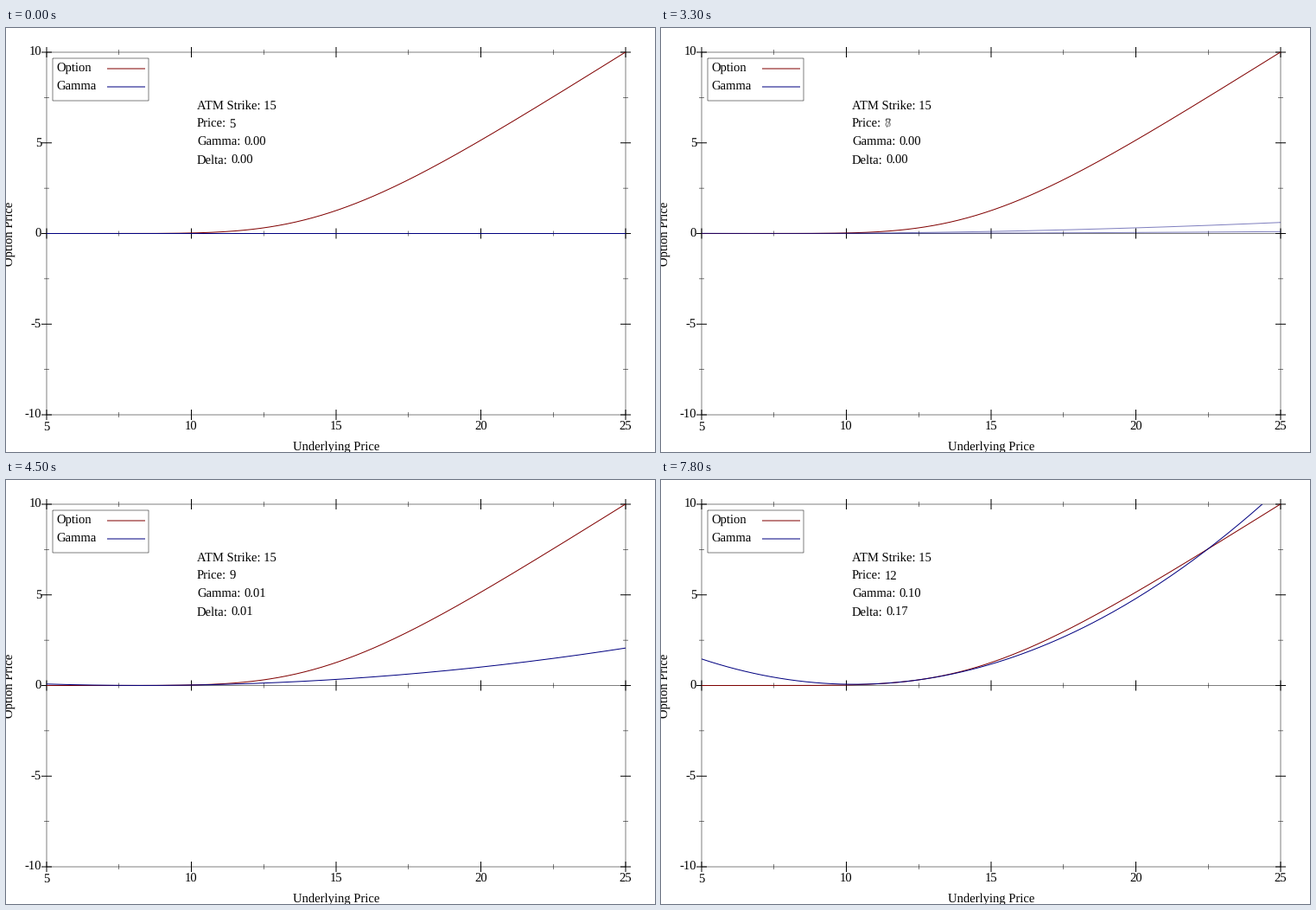
Recreate the animation shown at these times as a matplotlib script. Size 751 px wide and 490 px high, loop 8 s.

```python
import math

import matplotlib.pyplot as plt
import numpy as np
from matplotlib.animation import FuncAnimation
from matplotlib.patches import Rectangle

W, H, DPI = 751, 490, 64
PX = 72 / DPI                      # one pixel in points
LEFT, RIGHT, TOP, BOTTOM = 47, 717, 28, 447
ZERO, UNIT = 237.5, 20.95          # pixel row of y = 0, pixels per unit
STRIKE, SPREAD = 15, 0.3 * math.sqrt(0.5)
RED, BLUE, BLACK = "#800000", "#000080", "black"
FRAMES, INTERVAL = 80, 100
BLENDS = (9, 21, 33, 44, 55, 66, 77)   # half-way steps between two prices

plt.rcParams["font.family"] = "Liberation Serif"
plt.rcParams["text.hinting"] = "none"
fig = plt.figure(figsize=(W / DPI, H / DPI), dpi=DPI, facecolor="white")
ax = fig.add_axes([0, 0, 1, 1])
ax.set(xlim=(0, W), ylim=(H, 0))
ax.axis("off")


def px(x):
    return LEFT + (x - 5) * (RIGHT - LEFT) / 20


def py(y):
    return ZERO - UNIT * y


def stroke(xs, ys, color, width=1, z=2):
    return ax.plot(xs, ys, color=color, lw=width * PX, zorder=z, snap=False,
                   solid_capstyle="butt", solid_joinstyle="miter")[0]


def label(x, y, text="", ha="left", **kw):
    return ax.text(x, y, text, ha=ha, va="baseline", fontsize=14.67 * PX,
                   color=BLACK, **kw)


def cdf(d):
    return 0.5 * (1 + math.erf(d / math.sqrt(2)))


def greeks(s):
    """Call value, delta and gamma at underlying price s."""
    d1 = math.log(s / STRIKE) / SPREAD + SPREAD / 2
    delta = cdf(d1)
    value = s * delta - STRIKE * cdf(d1 - SPREAD)
    gamma = math.exp(-d1 * d1 / 2) / math.sqrt(2 * math.pi) / (s * SPREAD)
    return value, delta, gamma


def frame_box(x0, y0, x1, y1):
    stroke([x0, x1, x1, x0, x0], [y0, y0, y1, y1, y0], BLACK, 0.5)


def tick(x, y, half, vertical, width):
    dx, dy = (0, half) if vertical else (half, 0)
    stroke([x - dx, x + dx], [y - dy, y + dy], BLACK, width, 3)


def draw_axes():
    frame_box(LEFT, TOP, RIGHT, BOTTOM)
    stroke([LEFT, RIGHT], [ZERO, ZERO], BLACK, 0.5)
    for i in range(9):
        major = i % 2 == 0
        half, width = (6, 1) if major else (3, 0.5)
        x, y = px(5 + 2.5 * i), py(10 - 2.5 * i)
        for edge in (TOP, ZERO, BOTTOM):
            tick(x, edge, half, True, width)
        for edge in (LEFT, RIGHT):
            tick(edge, y, half, False, width)
        if major:
            label(x, 465, f"{5 + 2.5 * i:.0f}", "center")
            label(41, y + 4, f"{10 - 2.5 * i:.0f}", "right")
    label(382, 488, "Underlying Price", "center")
    label(9, 237.5, "Option Price", "center", rotation=90,
          rotation_mode="anchor")


def draw_legend():
    frame_box(54, 35, 165, 84)
    for name, y, color in (("Option", 47, RED), ("Gamma", 68, BLUE)):
        label(58, y + 4, name)
        stroke([117, 161], [y, y], color)


draw_axes()
draw_legend()

grid = np.linspace(5, 25, 201)
area = Rectangle((LEFT - 0.5, TOP - 0.5), RIGHT - LEFT + 1, BOTTOM - TOP + 1,
                 transform=ax.transData)
option = stroke(px(grid), py(np.array([greeks(s)[0] for s in grid])), RED, z=4)
curves = [stroke(px(grid), py(0 * grid), BLUE, z=5) for _ in range(2)]
for line in [option] + curves:
    line.set_clip_path(area)

label(221, 94, "ATM Strike: 15")
readouts = []
for name, x, y in (("Price:", 258.5, 115), ("Gamma:", 275, 136),
                   ("Delta:", 260.2, 157)):
    label(221, y, name)
    readouts.append([label(x, y) for _ in range(2)])


def values(price):
    _, delta, gamma = greeks(price)
    return str(price), f"{gamma:.2f}", f"{delta:.2f}"


def approximation(price):
    value, delta, gamma = greeks(price)
    step = grid - price
    return value + delta * step + gamma / 2 * step ** 2


def update(n):
    old = 5 + sum(n > b for b in BLENDS)
    new = old + (n in BLENDS)
    for line, price in zip(curves, (old, new)):
        line.set_ydata(py(approximation(price)))
        line.set_alpha(1 if old == new else 0.5)
    curves[1].set_visible(old != new)
    for pair, a, b in zip(readouts, values(old), values(new)):
        for text, string in zip(pair, (a, b)):
            text.set_text(string)
            text.set_alpha(1 if a == b else 0.5)
        pair[1].set_visible(a != b)
    return curves


anim = FuncAnimation(fig, update, frames=FRAMES, interval=INTERVAL,
                     repeat=True, repeat_delay=0, blit=False)
plt.show()
```
